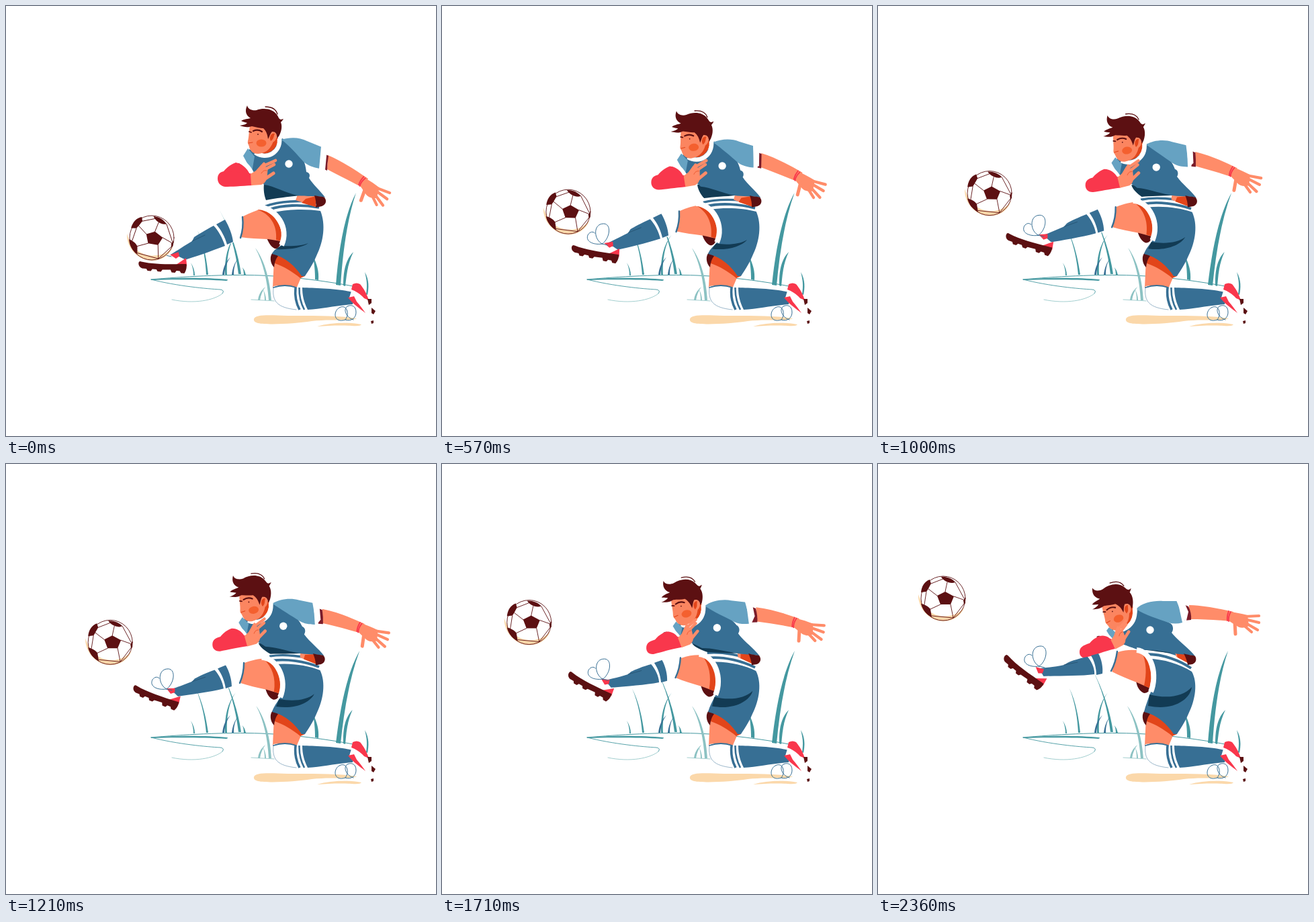
These frames come from a looping animation (640x640 px, 2430 ms). An HTML page:

```html
<!DOCTYPE html>
<html lang="en">
<head>
<meta charset="utf-8">
<title>Footballer</title>
<style>
html, body { margin: 0; width: 100%; height: 100%; overflow: hidden; background: #fff; }
svg { display: block; width: 100%; height: 100%; }
.blue { fill: #376f94; }
.light { fill: #66a2c2; }
.navy { fill: #123b54; }
.skin { fill: #ff8c69; }
.face { fill: #fb8560; }
.shade { fill: #e2451a; }
.red { fill: #f9374c; }
.dark { fill: #5c1012; }
.wine { fill: #7a1c2a; }
.white { fill: #fff; }
.cream { fill: #fbd8aa; }
.teal { fill: #4498a0; }
.pale { fill: #8cc2c3; }
.line { fill: none; stroke-linecap: round; stroke-linejoin: round; }
.flat { stroke-linecap: butt; }
.s-blue { stroke: #376f94; }
.s-teal { stroke: #4498a0; }
.s-pale { stroke: #8cc2c3; }
.s-white { stroke: #fff; }
.s-dark { stroke: #5c1012; }
.s-skin { stroke: #ff8c69; }
.s-red { stroke: #f9374c; }
.s-shade { stroke: #e2451a; }
</style>
</head>
<body>
<svg viewBox="0 0 640 640">
  <g id="ground">
    <path class="line s-teal" stroke-width="1" d="M216 407C262 403 325 399 380 401C430 403 480 410 522 418"/>
    <path class="teal" d="M216 407C250 404 300 404 329 407Q332 408 328 409C295 407 250 407 216 408Z"/>
    <path class="line s-teal" stroke-width=".9" d="M216 407C255 417 300 421 319 422Q326 423 322 428"/>
    <path class="line s-pale" stroke-width=".8" d="M322 428C310 438 280 444 247 437M365 437L400 439"/>
    <path class="cream" d="M369 466C370 459 390 460 420 461C460 461 500 461 522 465C515 469 480 466 455 469C430 473 390 475 375 472Q368 470 369 466Z"/>
    <path class="cream" d="M463 477C485 470 515 471 529 474Q527 477 515 476C495 475 480 476 463 477Z"/>
  </g>

  <g id="grass">
    <path class="teal" data-sway="496 416 -2.2" d="M491 415C495 365 503 312 521 278C507 320 501 370 498 416Z"/>
    <path class="teal" data-sway="503 416 1.5" d="M502 416C502 395 505 378 517 366C508 385 507 400 505 417Z"/>
    <path class="teal" d="M534 396C541 408 540 420 538 430L536 429C538 415 537 408 534 396Z"/>
    <path class="teal" d="M457 372C463 385 466 395 465 408L460 407C460 395 459 385 457 372Z"/>
    <path class="teal" data-sway="300 400 2.4" d="M285 334C295 355 299 380 301 400L298 400C297 380 294 357 285 334Z"/>
    <path class="teal" d="M318 304C335 335 346 370 350 399L346 399C342 365 333 332 318 304Z"/>
    <path class="teal" d="M342 340C331 355 328 380 329 400L326 400C325 375 330 355 342 340Z"/>
    <path class="blue" d="M334 374C327 380 323 390 322 400L325 400C326 390 328 382 334 374ZM344 377C339 385 337 392 336 400L339 400C339 392 340 386 344 377Z"/>
    <path class="teal" d="M275 382C279 388 281 395 281 401L279 401C279 395 278 388 275 382ZM352 389Q356 394 357 400L354 400Q354 394 352 389Z"/>
    <path class="pale" data-sway="393 438 -1" d="M371 360C386 380 393 410 395 438L391 438C389 410 383 382 371 360Z"/>
    <path class="pale" d="M386 418C379 424 376 430 375 438L378 438C379 430 382 424 386 418ZM381 419C385 425 387 432 387 438L385 438C385 430 384 424 381 419Z"/>
  </g>

  <g id="back-arm">
    <path class="skin" d="M479 222C500 231 520 244 539 257L530 270C515 262 495 252 478 243Z"
      data-to="M463 210C490 211 510 216 529 220L525 234C505 232 485 231 463 231Z"/>
    <g data-from="533 263 23 1" data-to="526 227 0 1">
      <path class="skin" d="M-2 -7C8 -6 16 -4 24 -2L26 14C18 18 12 17 8 14L-3 7Z"/>
      <path class="line s-skin" stroke-width="4.2" d="M20 0L41 -1M20 4L41 9M20 9L39 20M16 11L30 23"/>
      <path class="line s-skin" stroke-width="5" d="M5 8L6 26"/>
      <path class="line s-red" stroke-width="1.8" d="M-1 -7Q-5 0 -4 7M-4 -8Q-7 0 -6 6"/>
    </g>
  </g>

  <g id="knee-leg">
    <path class="skin" d="M399 376L440 402L432 421L397 419Z"/>
    <path class="shade" d="M398 366L440 376L445 402L438 405C426 395 412 387 400 383Z"/>
    <path class="dark" d="M397 367C392 372 393 383 399 389C400 382 401 377 405 372Z"/>
    <path class="white" d="M398 417Q415 414 434 419L440 452C420 453 402 444 398 437Z"/>
    <path class="line s-blue" stroke-width="1.8" d="M398 419Q415 413 432 419"/>
    <path class="line s-blue" stroke-width=".5" d="M398 420C396 440 404 449 432 452"/>
    <path class="blue" d="M441 419C460 420 495 420 520 427L516 444C490 446 470 451 449 452C443 440 441 430 441 419Z"/>
    <path class="line flat s-blue" stroke-width="3.6" d="M431 419Q429 437 437 452"/>
    <path class="line flat s-blue" stroke-width="2.6" d="M436.500 419Q436 437 444 452"/>
    <path class="white" d="M515 421L532 430L545 440L549 464L544 474L521 446L511 434Z"/>
    <path class="red" d="M516 414Q522 411 527 414C532 420 537 428 540 438L533 435C528 429 520 424 514 422Z"/>
    <path class="red" d="M509 434L518 432L522 440C527 446 531 451 535 457C526 450 516 443 509 434Z"/>
    <path class="dark" d="M538 436L544 436L544 442L540 445ZM544 449L550 454L547 459L544 457ZM543 469L547 468L547 472L544 473Z"/>
    <path class="line s-blue" stroke-width="1" d="M505 467C488 473 486 455 496 449C507 443 512 458 505 467C514 470 521 464 521 456C521 446 514 444 508 447C501 452 507 464 517 467"/>
  </g>

  <g id="shorts">
    <path class="blue" d="M400 307C420 302 450 302 468 305C476 325 473 350 462 372C456 386 450 394 445 402L440 402C431 388 417 374 396 369C399 362 405 360 410 356C420 338 412 318 400 307Z"
      data-to="M402 290C425 290 450 298 467 309C476 325 473 350 462 372C456 386 450 394 445 402L440 402C431 388 417 374 396 369C398 360 402 350 405 342C413 325 411 302 402 290Z"/>
    <path class="navy" d="M409 357C425 358 440 357 450 353C440 360 420 363 402 362Z"
      data-to="M404 343C430 350 455 346 467 332C465 350 440 368 402 360Z"/>
    <path class="line flat s-blue" stroke-width="3.4" d="M386 298C405 291 440 288 462 293" data-to="M398 275C420 275 450 283 465 294"/>
    <path class="line flat s-blue" stroke-width="3.8" d="M392 303C410 296 440 295 466 300" data-to="M400 283C425 283 450 293 466 304"/>
  </g>

  <g id="torso">
    <path class="skin" d="M434 281L461 282L461 299L431 289Z" data-to="M442 281L460 283L463 297L444 287Z"/>
    <path class="shade" d="M446 287L461 283L461 299L440 293Z" data-to="M444 281L460 283L463 297L446 288Z"/>
    <path class="navy" d="M384 265C400 266 425 275 438 282C420 284 400 286 387 289C384 282 383 272 384 265Z"
      data-to="M368 268C392 266 425 278 442 281C430 282 412 278 400 277C388 276 372 272 368 268Z"/>
    <path class="blue" d="M362 213C380 224 400 212 411 197C425 203 445 220 447 247C452 248 453 252 451 256C457 266 468 275 475 285C465 282 445 284 434 282C415 278 400 268 384 266C380 258 364 247 360 232Z"
      data-to="M348 245C370 250 384 238 386 216C400 220 425 232 435 237C440 240 440 247 437 251C446 263 463 274 472 286C462 283 448 284 437 281C415 277 400 276 388 277C372 270 350 266 346 255Z"/>
    <path class="dark" d="M459 282C466 284 472 283 474 285C478 290 476 296 470 298L461 300C462 294 461 288 459 282Z"
      data-to="M455 282C462 285 470 284 472 286C475 291 473 296 468 298L461 299C460 293 458 288 455 282Z"/>
    <path class="shade" d="M372 216C388 226 405 214 405 196L394 196Z" data-to="M356 243C372 245 383 230 379 211L366 212Z"/>
    <path class="light" d="M410 199C422 195 437 195 448 201L470 210L467 242C457 240 450 238 443 232C433 221 422 208 410 199Z"
      data-to="M384 216C393 206 412 203 424 204L446 204L453 236C446 238 439 238 432 236C418 231 398 225 384 216Z"/>
    <path class="wine" d="M476 221L480 223Q478 235 478 245L474 243Z" data-to="M457 210L462 212Q467 222 466 232L456 233Z"/>
    <path class="white" d="M469 209L478 212L475 244L466 242Z" data-to="M444 203L455 204Q462 220 458 237L452 237Z"/>
    <path class="line flat s-white" stroke-width="6.5" d="M371 218C388 230 409 218 407 197" data-to="M350 247C368 250 385 238 382 214"/>
    <circle class="white" r="5.7" data-from="421 235 0 1" data-to="405 247 0 1"/>
  </g>

  <g id="front-shoulder">
    <path class="light" d="M353 223L360 212L370 224L366 247Z" data-to="M340 248L344 243L353 250L350 264Z"/>
    <path class="wine" d="M340 236C346 230 359 238 363 250L350 249Z" data-to="M325 257C333 252 346 258 350 266L338 266Z"/>
    <path class="white" d="M347 228C354 227 365 238 369 248L364 252C358 242 350 236 344 232Z"
      data-to="M331 249C339 249 347 256 351 263L347 268C342 260 335 257 327 255Z"/>
  </g>

  <g data-from="380 204 0 1" data-to="358 230 -20 1">
    <g id="head" transform="translate(-380 -204)">
      <path class="face" d="M364 174C361 186 362 194 360 201C359 205 362 207 362 210C364 217 369 220 375 220C386 219 392 214 396 206L402 192C402 184 395 178 390 176Z"/>
      <ellipse class="face" cx="397" cy="194" rx="6" ry="9" transform="rotate(15 397 194)"/>
      <path class="shade" d="M394 201C391 195 395 188 400 190C398 194 399 198 394 201Z"/>
      <path class="dark" d="M350 171C355 168 360 168 364 167C357 163 355 156 359 148C360 154 367 156 373 155C384 151 398 153 404 163C406 166 406 168 409 169L413 168C411 171 410 172 409 173C412 180 409 189 406 194L403 197C404 190 401 187 396 187C393 190 392 195 390 198C389 190 387 186 383 182C378 182 372 180 366 179L362 180C357 181 352 179 348 178C354 177 357 176 359 174C355 173 352 172 350 171Z"/>
      <path class="line s-dark" stroke-width="1.3" d="M386 150C397 150 402 154 404 161"/>
      <path class="line s-dark" stroke-width="2.2" d="M368 186Q375 183 381 187"/>
      <path class="line s-dark" stroke-width="1.8" d="M362 187L365 188"/>
      <circle class="dark" cx="375" cy="191" r=".9"/>
      <path class="line s-shade" stroke-width="1" d="M361 204L367 203"/>
      <ellipse fill="#f4602f" cx="380" cy="204" rx="7.5" ry="5.5"/>
    </g>
  </g>

  <g id="front-arm">
    <path class="red" d="M342 233C350 234 359 241 363 251L322 249C326 242 334 236 342 233Z"
      data-to="M330 256C338 254 346 258 350 266L312 271C316 264 322 259 330 256Z"/>
    <path class="red" d="M315 257C315 249 321 245 330 246C345 247 358 248 367 250L367 267C350 268 335 269 326 269C319 268 315 263 315 257Z"
      data-to="M300 280C300 272 306 270 314 267C328 263 340 262 347 260L353 275C335 279 325 284 312 288C304 290 300 286 300 280Z"/>
    <g data-from="366 258 0 1" data-to="351 268 -24 .87">
      <path class="skin" d="M-2 -8L6 -13L14 -22L24 -17C22 -8 25 4 14 8L-1 9Z"/>
      <path class="line s-skin" stroke-width="4.6" d="M15 -19L35 -28M18 -14L33 -22M8 -11L18 -23"/>
      <path class="line s-skin" stroke-width="5" d="M14 3L32 -9"/>
      <path class="line s-shade" stroke-width=".7" d="M22 -13C18 -14 16 -12 14 -9"/>
    </g>
  </g>

  <g id="kick-leg">
    <path class="dark" d="M388 345L410 350C408 358 404 362 400 361C395 359 391 353 388 345Z"
      data-to="M384 322L405 330C405 337 402 341 396 341C390 339 385 332 384 322Z"/>
    <path class="skin" d="M353 313C363 308 372 304 382 302C401 308 411 330 409 350L390 347C375 346 362 346 349 344Z"
      data-to="M357 280C370 276 380 276 391 278C406 290 407 315 403 333L385 325C372 320 360 315 346 308Z"/>
    <path class="shade" d="M374 303C395 302 415 328 410 350L402 348C404 325 392 309 374 303Z"
      data-to="M392 278C406 285 411 310 404 333L396 330C400 312 400 295 392 278Z"/>
    <path class="line flat s-white" stroke-width="8" d="M376 299C402 301 422 330 410 356" data-to="M385 277C408 279 416 315 406 339"/>
    <path class="white" d="M326 318C336 312 345 312 353 314L350 346C345 348 340 351 336 353L322 357L309 327Z"
      data-to="M326 284C338 280 348 278 357 279L348 310C342 312 336 314 333 314L322 313L312 287Z"/>
    <path class="line s-blue" stroke-width="2.4" d="M352 314Q354 330 349 345" data-to="M356 279Q354 295 347 308"/>
    <path class="blue" d="M313 325C318 322 322 320 326 318C332 328 337 341 338 351L329 355C326 344 320 333 313 325Z"
      data-to="M317 285C321 284 325 283 328 282C333 291 335 303 334 312L325 314C325 304 322 293 317 285Z"/>
    <path class="blue" d="M309 327C298 333 284 341 280 344L277 350C265 357 255 364 245 370L262 379C280 374 305 365 326 357C322 345 316 334 309 327Z"
      data-to="M312 287C300 289 288 293 282 296L277 299C265 302 252 303 241 304L243 316C265 315 300 316 322 313C323 305 318 294 312 287Z"/>
    <path class="line" stroke="#24506e" stroke-width=".8" d="M277 350L296 341" data-to="M277 299L297 295"/>

    <g data-from="267 390 4 1" data-to="242 331 39 1">
      <path class="white" d="M-70 -4C-60 -9 -42 -11 -24 -18L-10 -16L0 -12L0 -4Z"/>
      <path class="red" d="M-14 -4L0 -15L2 -3ZM-24 -18L-12 -23L-10 -17L-15 -13Z"/>
      <path class="dark" d="M-70 -2Q-70 -6 -66 -5C-48 -2 -25 -4 1 -6C2 -2 2 3 -1 8L-6 8L-8 5L-13 5L-15 8L-20 8L-22 4L-34 5L-36 8L-41 8L-43 5L-49 5L-51 8L-56 8L-58 5L-64 5C-68 4 -70 1 -70 -2Z"/>
    </g>
    <g data-from="238 371 0 1" data-to="240 301 0 1">
      <path class="line s-blue" stroke-width="1" d="M0 0C-13 -6 -14 -30 2 -30C14 -30 12 -9 0 0C-14 2 -26 -4 -21 -14C-18 -18 -14 -19 -11 -16M0 0L8 2"/>
    </g>
  </g>

  <g id="ball">
    <circle class="white" r="33"/>
    <path class="cream" d="M-37 -6C-38 14 -21 34 0 34C15 34 27 26 32 12C23 25 8 28 -5 26C-22 23 -32 10 -37 -6Z"/>
    <g id="patches">
      <path class="dark" d="M-9 -4L3 -10L16 -3L11 9L-4 9ZM-3 -32C5 -33 14 -29 18 -24C14 -22 8 -23 3 -26C0 -28 -2 -30 -3 -32ZM-20 -28L-18 -22C-21 -17 -22 -14 -25 -10L-33 -9C-32 -18 -28 -25 -20 -28ZM-33 8C-27 9 -22 12 -19 16L-17 28C-25 24 -31 17 -33 8ZM33 -2L33 7L31 9L30 3Z"/>
      <path class="line s-dark" stroke-width=".9" d="M-9 -4L-22 -14M3 -10L6 -24M16 -3L30 2M11 9L15 29M-4 9L-19 16M-18 -22L0 -29M-25 -10L-28 9M18 -24L31 0M31 8L15 29L-17 26"/>
    </g>
    <circle class="line s-dark" stroke-width=".9" r="33"/>
  </g>
</svg>
<script>
const LOOP = 2430, STEPS = 34, FPS = 14;
const starts = Array.from({ length: STEPS }, (_, k) => Math.round(k * 100 / FPS) * 10);
const NUM = /-?\d*\.?\d+/g;
const nums = s => s.match(NUM).map(Number);
const lerp = (a, b, p) => a + (b - a) * p;
const pick = sel => [...document.querySelectorAll(sel)];

const morphs = pick('path[data-to]').map(el => ({
  el, shape: el.getAttribute('d'), from: nums(el.getAttribute('d')), to: nums(el.dataset.to)
}));
const movers = pick('[data-from]').map(el => ({
  el, from: nums(el.dataset.from), to: nums(el.dataset.to)
}));
const blades = pick('[data-sway]').map(el => ({ el, sway: nums(el.dataset.sway) }));
const ball = document.getElementById('ball');
const patches = document.getElementById('patches');

function pose(p) {
  for (const { el, shape, from, to } of morphs) {
    let i = 0;
    el.setAttribute('d', shape.replace(NUM, () => lerp(from[i], to[i++], p).toFixed(2)));
  }
  for (const { el, from, to } of movers) {
    const [x, y, r, s] = from.map((v, i) => lerp(v, to[i], p));
    el.setAttribute('transform', `translate(${x} ${y}) rotate(${r}) scale(${s})`);
  }
  const wind = Math.sin(Math.PI * p);
  for (const { el, sway: [x, y, a] } of blades) {
    el.setAttribute('transform', `translate(${x} ${y}) skewX(${a * wind}) translate(${-x} ${-y})`);
  }
  const bx = lerp(217, 97, p), by = lerp(345, 200, p) - 20 * p * (1 - p);
  ball.setAttribute('transform', `translate(${bx} ${by})`);
  patches.setAttribute('transform', `rotate(${10 * (1 - p) ** 6})`);
}

const t0 = performance.now();
let shown = -1;
function tick() {
  const t = (performance.now() - t0) % LOOP;
  let k = STEPS - 1;
  while (starts[k] > t) k--;
  if (k !== shown) pose((shown = k) / (STEPS - 1));
  requestAnimationFrame(tick);
}
tick();
</script>
</body>
</html>
```
